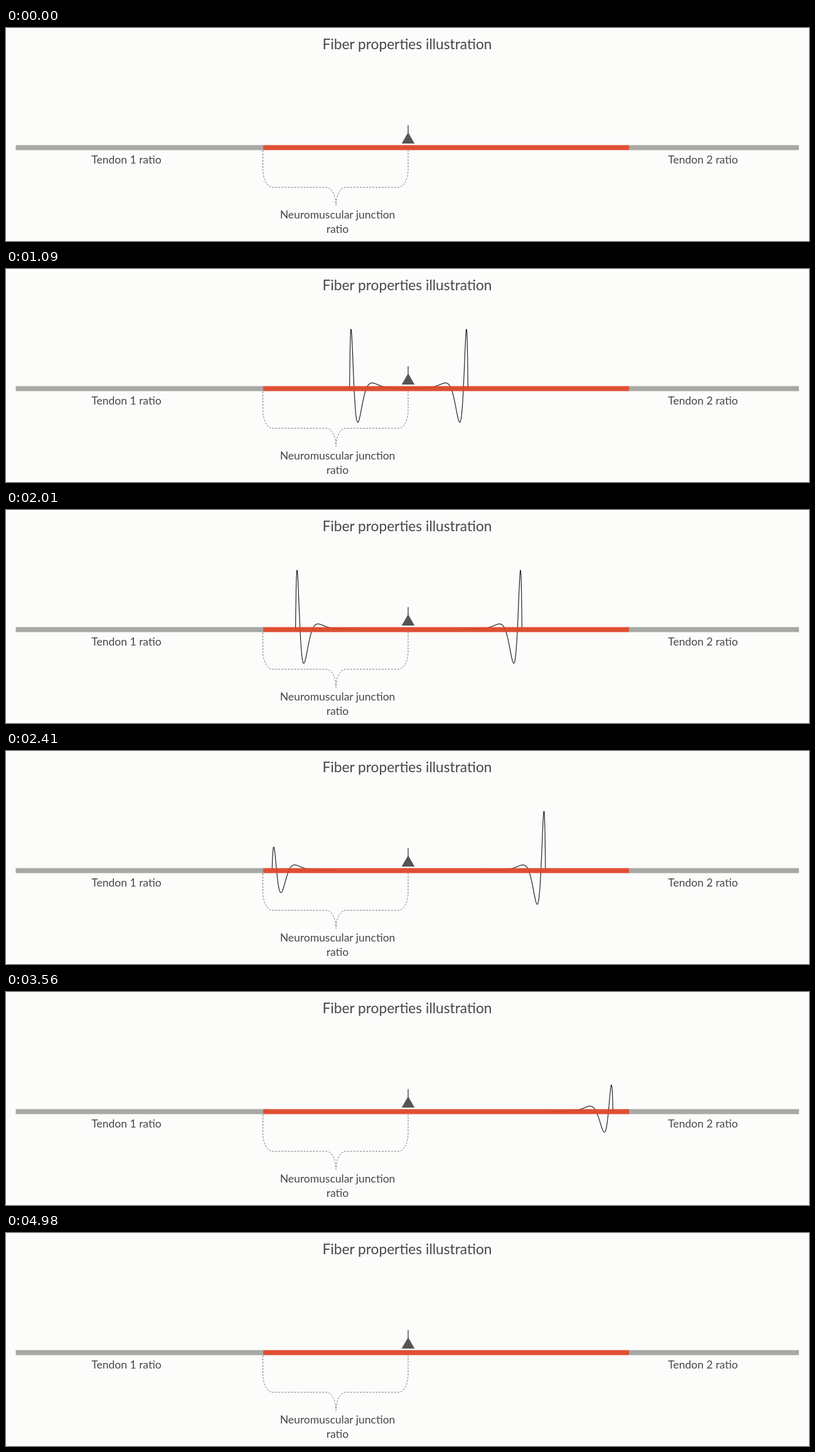
An HTML page for the animation above (5.06 s loop, 1280 by 341 pixels).

```html
<!DOCTYPE html>
<html lang="en">
<head>
<meta charset="utf-8">
<title>Fiber properties illustration</title>
<style>
  html, body { margin: 0; width: 100%; height: 100%; overflow: hidden; background: #fcfcfb; }
  svg { display: block; }
  text { font: 17.5px Lato, "Open Sans", sans-serif; fill: #474747; text-anchor: middle; }
  .title { font-size: 22.7px; }
  .wave { fill: none; stroke: #1c1c1c; stroke-width: 1.15; stroke-linejoin: round; }
  .brace { fill: none; stroke: #77777f; stroke-width: 1; stroke-dasharray: 3 2; }
</style>
</head>
<body>
<svg width="1280" height="341" viewBox="0 0 1280 341">
  <text class="title" x="639.5" y="34">Fiber properties illustration</text>
  <path class="wave" id="left"/>
  <path class="wave" id="right"/>
  <path fill="#a8a8a4" d="M15.5 187.5H410v8H15.5zM993.5 187.5H1264v8H993.5z"/>
  <path fill="#dd4528" fill-opacity=".94" d="M410 187.5H993.5v8H410z"/>
  <path fill="#555" d="M641 167l10.3 18h-20.6z"/>
  <path stroke="#555" stroke-width="1.5" d="M641 155.5V170"/>
  <path class="brace" d="M409.5 196V226A15.5 29 0 0 0 425 255H510.500A15.500 29 0 0 1 526 284A15.500 29 0 0 1 541.500 255H625.500A15.500 29 0 0 0 641 226V196"/>
  <text x="192" y="217">Tendon 1 ratio</text>
  <text x="1111" y="217">Tendon 2 ratio</text>
  <text x="528.5" y="305">Neuromuscular junction</text>
  <text x="528.5" y="328">ratio</text>
</svg>
<script>
const LOOP = 5060, START = 83, SPEED = 0.0936;
const ORIGIN = 642, BASE = 191, GAIN = 94, SCALE = 5.7;
const ONSET = 30, TAPER = 0.182;
const clamp = v => Math.max(0, Math.min(1, v));

// Second derivative of z^3 e^-z: the travelling membrane current.
const pulse = z => (6 * z - 6 * z * z + z ** 3) * Math.exp(-z);

// The pulse rises near the junction and tapers off at the fiber end.
function wavePath(dir, length, front) {
  const points = [];
  for (let lag = 0; lag <= 100; lag += 0.25) {
    const dist = front - lag;
    if (dist < 0) break;
    if (dist > length) continue;
    const envelope = clamp(dist / ONSET) * clamp((length - dist) / (length * TAPER));
    const y = BASE - GAIN * envelope * pulse(lag / SCALE);
    points.push((ORIGIN + dir * dist).toFixed(2) + "," + y.toFixed(2));
  }
  return points.length > 1 ? "M" + points.join("L") : "";
}

const left = document.getElementById("left");
const right = document.getElementById("right");

function draw() {
  const front = (performance.now() % LOOP - START) * SPEED;
  left.setAttribute("d", wavePath(-1, 232, front));
  right.setAttribute("d", wavePath(1, 351.5, front));
  requestAnimationFrame(draw);
}
draw();
</script>
</body>
</html>
```
